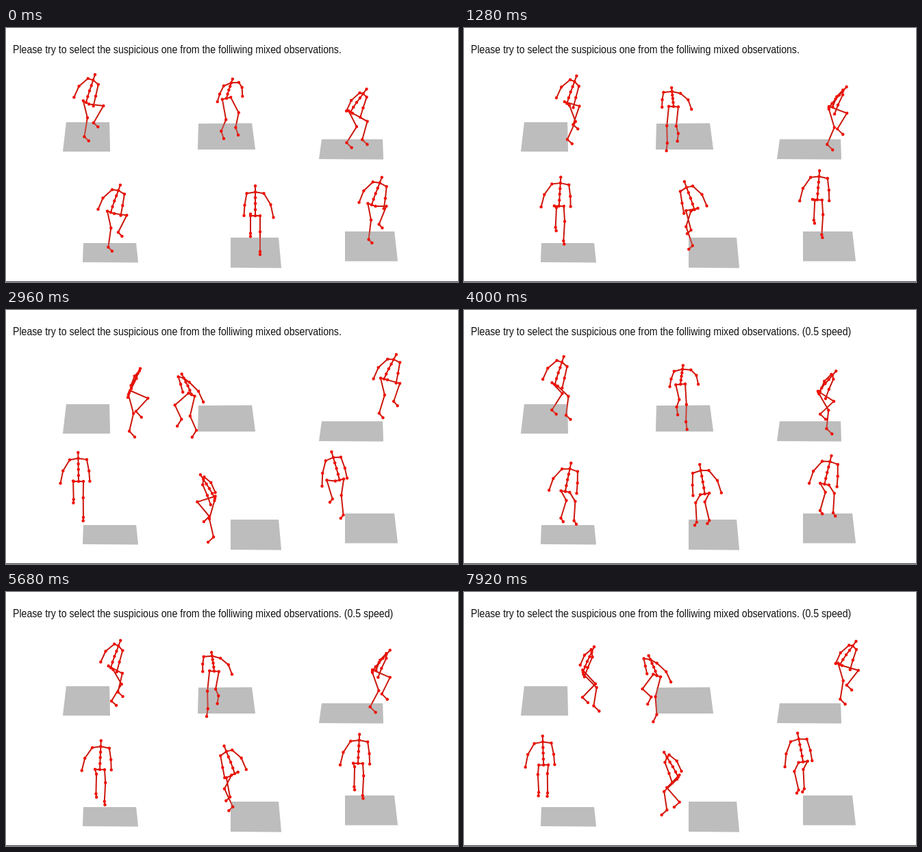
An HTML page for the animation above (8000 ms loop, 660 px wide and 372 px high).

```html
<!DOCTYPE html>
<html lang="en">
<head>
<meta charset="utf-8">
<title>Mixed observations</title>
<style>
html, body { margin: 0; width: 100%; height: 100%; overflow: hidden; background: #fff; }
svg { display: block; width: 100%; height: 100%; }
text { font: 17.4px "Liberation Sans", Arial, sans-serif; fill: #111; }
.bones { fill: none; stroke: #cb180d; stroke-width: 2; stroke-linecap: round; stroke-linejoin: round; }
.joints { fill: none; stroke: #f01206; stroke-width: 4.5; stroke-linecap: round; }
</style>
</head>
<body>
<svg viewBox="0 0 660 372">
  <rect width="660" height="372" fill="#fff"/>
  <text id="title" transform="translate(10 36.6) scale(.8125 1)"></text>
  <g id="stage"></g>
  <rect y="371" width="660" height="1" fill="#3c4046"/>
</svg>
<script>
const LOOP = 8000, STEP = 80, SLOW_AT = 3040;
const MIDDLE = 1400, END = 2960;
const TITLE = "Please try to select the suspicious one from the folliwing mixed observations.";
const TORSO = 40, SHOULDERS = 25, HIPS = 14, THIGH = 28, SHIN = 27, FOOT = 8;
const title = document.getElementById("title");
const stage = document.getElementById("stage");

// path: pelvis x, pelvis y and heading (0 = right, 90 = to the viewer) at start, middle and end.
// tilt: how far the ground opens to the viewer. lift: time of the first leg's highest knee.
const walkers = [
  { plate: "88,138 151,138 152,181 83,181", tilt: .44, lean: 24,
    path: [[117, 109, -37], [153, 111, -29], [180, 121, 10]] },
  { plate: "281,140 359,139.5 364,178 280,178", tilt: .42, lean: 28, period: 2050, lift: 750,
    path: [[322, 103, 62], [304, 116, 102], [271, 124, 140]] },
  { plate: "461,163 550,163 551,192.5 457,192", tilt: .28, lean: 40, period: 3240, lift: 2730,
    path: [[503, 123, -24], [535, 116, 0], [552, 101, -46]] },
  { plate: "113,315 190,315 193,343.5 112,343", tilt: .38, lean: 30,
    path: [[153, 270, -46], [137, 260, -85], [106, 251, -92]] },
  { plate: "328,307 398,307 402,351.5 328,351", tilt: .46, lean: 32, mirror: -1,
    path: [[364, 275, -90], [334, 266, -43], [305, 276, -5]] },
  { plate: "495,298 567,298 572,341.5 495,341.5", tilt: .45, lean: 38,
    path: [[534, 259, -53], [514, 251, -85], [487, 249, -118]] }
];

function make(tag, attrs) {
  const el = document.createElementNS("http://www.w3.org/2000/svg", tag);
  for (const k in attrs) el.setAttribute(k, attrs[k]);
  return stage.appendChild(el);
}

// The plate is drawn again, faintly, because the bones lie behind it.
for (const w of walkers) {
  make("polygon", { points: w.plate, fill: "#bdbdbd" });
  w.bones = make("path", { class: "bones" });
  make("polygon", { points: w.plate, fill: "#bdbdbd", opacity: .25 });
  w.joints = make("path", { class: "joints" });
}

const rad = deg => deg * Math.PI / 180;
const spot = p => p[0].toFixed(2) + " " + p[1].toFixed(2);

// Parabola through the start, middle and end values.
function along([a, b, c], u) {
  return a * (u - MIDDLE) * (u - END) / (MIDDLE * END)
    + b * u * (END - u) / (MIDDLE * (END - MIDDLE))
    + c * u * (u - MIDDLE) / (END * (END - MIDDLE));
}

function skeleton(w, u) {
  const { tilt, lean, mirror = 1, period = 1960, lift = 80 } = w;
  const [x, y, yaw] = [0, 1, 2].map(i => along(w.path.map(k => k[i]), u));
  const cos = Math.cos(rad(yaw)), sin = Math.sin(rad(yaw));

  // Step from a joint by body distances: forward, to the right, down.
  const go = (p, fwd, side, down) => [
    p[0] + mirror * (cos * fwd - sin * side),
    p[1] + tilt * (sin * fwd + cos * side) + down
  ];
  const swing = (p, length, deg) =>
    go(p, length * Math.sin(rad(deg)), 0, length * Math.cos(rad(deg)));

  const pelvis = [x, y];
  const bend = TORSO * Math.sin(rad(lean)), rise = TORSO * Math.cos(rad(lean));
  const spine = [[1, 1], [.79, .8], [.59, .61], [.38, .42], [.18, .21], [0, 0]]
    .map(([f, h]) => go(pelvis, bend * f, 0, -rise * h));
  const chest = spine[1];

  // The left arm is held wider than the right one.
  function arm(dir, elbow, hand) {
    const s = go(chest, 0, dir * SHOULDERS / 2, 2);
    const e = go(s, ...elbow);
    return [chest, s, e, go(e, ...hand)];
  }

  function leg(dir, peak) {
    const turn = t => Math.cos(2 * Math.PI * (u - t) / period);
    const hip = go(pelvis, 0, dir * HIPS / 2, 0);
    const knee = swing(hip, THIGH, 43 + 28 * turn(peak));
    const ankle = swing(knee, SHIN, -27 - 21 * turn(peak - period / 6));
    return [pelvis, hip, knee, ankle, go(ankle, FOOT, 0, FOOT)];
  }

  return [
    spine,
    arm(-1, [-9, -10, 12.5], [-6, -4, 16]),
    arm(1, [-7, 3, 14], [-5, 1, 13]),
    leg(1, lift),
    leg(-1, lift + period / 2)
  ];
}

function draw(ms) {
  const t = Math.floor(ms % LOOP / STEP) * STEP, slow = t >= SLOW_AT;
  const u = slow ? STEP + (t - SLOW_AT) / 2 : t;
  title.textContent = TITLE + (slow ? " (0.5 speed)" : "");
  for (const w of walkers) {
    const chains = skeleton(w, u);
    w.bones.setAttribute("d", chains.map(c => "M" + c.map(spot).join("L")).join(""));
    w.joints.setAttribute("d", chains.flat().map(p => "M" + spot(p) + "h.01").join(""));
  }
}

const start = performance.now();
function tick() {
  draw(performance.now() - start);
  requestAnimationFrame(tick);
}
tick();
</script>
</body>
</html>
```
